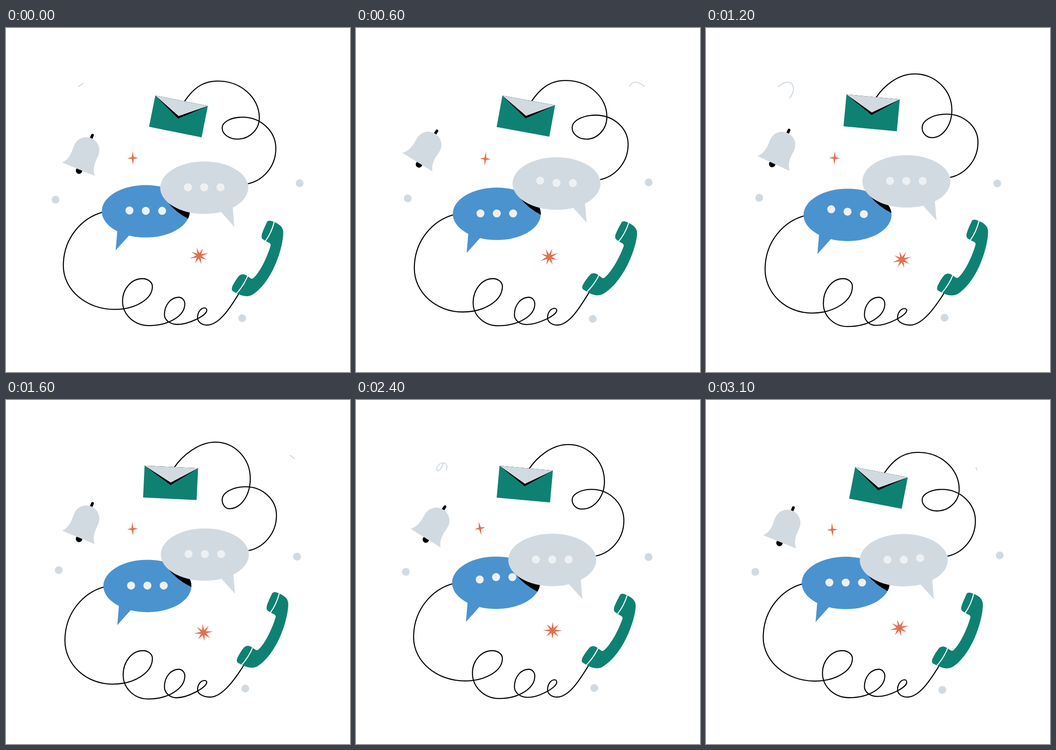
Recreate the animation shown at these times as an HTML page. Size 748 px wide and 748 px high, loop 3200 ms.

```html
<!DOCTYPE html>
<html lang="en">
<head>
<meta charset="utf-8">
<title>Messages</title>
<style>
  html, body { margin: 0; width: 100%; height: 100%; overflow: hidden; background: #fff; }
  svg { display: block; width: 100%; height: 100%; }
  .pale { fill: #d2dae1; }
  .teal { fill: #0f8173; }
  .coral { fill: #e07050; }
  .cord { fill: none; stroke: #000; stroke-width: 2.3; }
  .curl { fill: none; stroke: #d2dae1; stroke-width: 2.2; }
  .seam { fill: none; stroke: #fff; stroke-width: 2.2; }
  .dots { fill: #eef1f3; }
</style>
</head>
<body>
<svg viewBox="0 0 748 748">
  <defs>
    <clipPath id="blueClip"><ellipse rx="95.7" ry="57"/></clipPath>
    <path id="curl" pathLength="100" d="M157 128C164 122 171 117 180 118C191 120 192 132 188 142C184 152 179 155 176 153C173 147 182 136 190 136.5C197 137 200 145 196 153"/>
  </defs>

  <use id="curlLeft" class="curl" href="#curl"/>
  <use id="curlRight" class="curl" href="#curl" transform="translate(785 0) scale(-1 1)"/>

  <circle id="dotLeft" class="pale" r="8.5"/>
  <circle id="dotRight" class="pale" r="8.5"/>
  <circle id="dotBottom" class="pale" r="8.5"/>

  <path id="sparkle" class="coral"/>
  <path id="burst" class="coral"/>

  <path id="upperCord" class="cord"/>
  <path id="lowerCord" class="cord"/>

  <g id="envelope">
    <path class="teal" d="M0 0H116.5V69.5H0Z"/>
    <path d="M0 0H116.5L58.5 39.5Z"/>
    <path class="pale" d="M0 0H116.5L58.5 34Z"/>
  </g>

  <!-- The bell hangs from a pivot 61 units above its dome. -->
  <g id="bell"><g transform="translate(0 61)">
    <circle id="clapper" cy="47" r="7"/>
    <path d="M0-24V-35.5" stroke="#000" stroke-width="6" stroke-linecap="round"/>
    <path class="pale" d="M-38.5 44.6C-32 37-29 31-28 16L-28.5 0A28.5 28.5 0 0 1 28.5 0L28 16C29 31 32 37 38.5 44.6Z"/>
  </g></g>

  <g id="blue">
    <g fill="#4b93cf"><ellipse rx="95.7" ry="57"/><path d="M-34 50L-65.5 85-61.5 38Z"/></g>
    <g id="blueDots" class="dots"/>
    <g clip-path="url(#blueClip)"><path id="shade" d="M-78 33Q-61 54-34 68L-20 75V20Z"/></g>
  </g>
  <g id="grey">
    <g class="pale"><ellipse rx="95.7" ry="57"/><path d="M34 50L65.5 85 61.5 38Z"/></g>
    <g id="greyDots" class="dots"/>
  </g>

  <g id="phone"><g transform="translate(-531.5 -493.5)">
    <path class="teal" d="M571 419C573 418 576 418.500 584 422C595 427 603 433 602.500 446C602 470 590 512 570 543C558 562 545 574 535 580C525 585 515 583 502 577L493 572C490 570 490 566 492 561C496 553 501 545 506 539C510 535 516 534 521 537L526 540C531 544 534 546 537 544C552 531 568 497 575 473C576 469 573 467 568 465L558 459C555 457 555 452 556 448C559 438 564 429 567 422C568 420 569 419 571 419Z"/>
    <path class="seam" d="M583 421Q577 445 563 464M526 537Q516 561 500 578"/>
  </g></g>
</svg>
<script>
const LOOP = 3200, STEP = 100, SWING = LOOP / 2, BOUNCE = LOOP / 3;
const $ = id => document.getElementById(id);
const mod = (a, n) => ((a % n) + n) % n;
const clamp = v => Math.min(1, Math.max(0, v));

// A cosine around a centre that is highest at the given time.
const wave = (center, reach, peak, period = LOOP) =>
  t => center + reach * Math.cos((t - peak) / period * 2 * Math.PI);
const drift = (x, y) => {
  const fx = wave(...x), fy = wave(...y);
  return t => [fx(t), fy(t)];
};

const move = {
  envelope: drift([313, 11.7, 40], [144.7, 2.6, 350]),
  grey: drift([431.7, 5, 870], [341.7, 8.2, 2778]),
  blue: drift([305.7, 2.1, 1300], [401.5, 5, 1120]),
  bell: drift([197.7, 9, 2400], [205.3, 6.6, 2740]),
  phone: drift([537.3, 5.9, 1400], [493.3, 1.2, 2650]),
  sparkle: drift([275.5, 6, 780], [281.6, 2.9, 590]),
  burst: drift([424.5, 5.6, 1870], [500.5, 5.2, 1670]),
  dotLeft: drift([111.2, 4.6, 1240], [371.7, 2.5, 2750]),
  dotRight: drift([635.7, 2.9, 3110], [338.9, 3.1, 2145]),
  dotBottom: drift([517, 3.5, 1750], [629.2, 3.4, 535])
};
const turn = {
  envelope: wave(7, 4.7, 210),
  sparkle: wave(-2.7, 8, 740),
  burst: wave(-11, 13.5, 2200),
  bell: wave(27, 5.2, 690, SWING),
  phone: wave(1.3, 2.2, 560, SWING)
};
const clapperX = wave(2.2, 4.5, 400, SWING);

// Extreme points of the upper cord.
const cordTop = drift([458, 4.5, 2750], [103.5, 13.6, 260]);
const cordRight = drift([541, 9.9, 40], [183, 13.5, 220]);
const loopLow = drift([494.5, 9.2, 200], [239, 3.2, 300]);
const loopTop = drift([517.5, 6.2, 1110], [191.3, 4, 2765]);
const lift = wave(0, 1.6, 1800);

function star(count, radius, inner) {
  const polar = (r, i) => {
    const a = i / count * 2 * Math.PI;
    return [r * Math.sin(a), -r * Math.cos(a)];
  };
  let points = [];
  for (let i = 0; i < count; i++) points.push(polar(radius(i), i), polar(inner, i + 0.5));
  return "M" + points.join("L") + "Z";
}
$("sparkle").setAttribute("d", star(4, i => i % 2 ? 12 : 15, 3));
$("burst").setAttribute("d", star(8, i => i % 4 === 2 ? 21 : 18.7, 6));

for (const id of ["blueDots", "greyDots"])
  $(id).innerHTML = [-35.5, 0, 35.5].map(x => `<circle cx="${x}" r="8.7"/>`).join("");

// Quarter-ellipse arcs joining points that alternate between vertical and horizontal tangents.
function arcs(points, vertical) {
  const k = 0.5523;
  let d = "";
  for (let i = 1; i < points.length; i++, vertical = !vertical) {
    const [a, b] = points[i - 1], [c, e] = points[i], dx = (c - a) * k, dy = (e - b) * k;
    d += vertical ? `C${a} ${b + dy} ${c - dx} ${e} ${c} ${e}` : `C${a + dx} ${b} ${c} ${e - dy} ${c} ${e}`;
  }
  return d;
}

// Where a local point of a moving part lies on the stage.
function anchor(id, t, dx, dy) {
  const [x, y] = move[id](t), a = turn[id](t) * Math.PI / 180, c = Math.cos(a), s = Math.sin(a);
  return [x + dx * c - dy * s, y + dx * s + dy * c];
}

function drawUpperCord(t, [gx, gy]) {
  const [sx, sy] = anchor("envelope", t, 64, 2);
  const top = cordTop(t), far = [gx + 155.7, gy - 85.3];
  const [ex, ey] = [gx + 95, gy - 8.7];
  $("upperCord").setAttribute("d", `M${sx} ${sy}C${sx + 18} ${sy - 27} ${top[0] - 36} ${top[1]} ${top}`
    + arcs([top, cordRight(t), loopLow(t), [470, 217], loopTop(t), far], false)
    + `C${far[0]} ${far[1] + 42} ${ex + 30} ${ey - 6} ${ex} ${ey}`);
}

function drawLowerCord(t, [bx, by]) {
  const sag = by - 398, rise = lift(t);
  const [ex, ey] = anchor("phone", t, -23.5, 80.5);
  const endX = 437 + (ex - 508) * 0.6;
  const left = [bx - 179.3, by + 118.5], bottom = [373 - sag * 0.4, 646 + rise];
  $("lowerCord").setAttribute("d",
    `M${bx - 94} ${by + 2}C${bx - 138} ${by + 14} ${left[0]} ${by + 57} ${left}`
    + arcs([left, [236.5 - sag * 0.75, by + 213.4], [318.3, 562], [296.5 + sag * 0.2, 545],
      [253.3 + sag * 0.22, 594 + sag * 0.6], [311 - sag * 0.35, 648.6 + rise],
      [388.8, 600], [375.5, 585.5], [344.5, 623.5], bottom], true)
    + `C${bottom[0] + 25} ${bottom[1]} 436.5 625 436.5 614`
    + arcs([[436.5, 614], [432, 608.5 + sag * 0.2], [416.5, 630], [endX, 646]], true)
    + `C${endX + 28} 646 ${ex - 18} ${ey + 29} ${ex} ${ey}`);
}

function bounceDots(id, t, start) {
  [...$(id).children].forEach((dot, i) => {
    const u = clamp((mod(t - start, BOUNCE) - i * BOUNCE / 16) / 400);
    dot.setAttribute("cy", -1 - 6.1 * (1 - Math.cos(u * 2 * Math.PI)));
  });
}

function trimCurl(id, t, start) {
  const u = mod(t - start, BOUNCE);
  const head = 100 * clamp(u / 290), tail = 100 * clamp((u - 166) / 320);
  const { style } = $(id);
  style.visibility = head > tail ? "visible" : "hidden";
  style.strokeDasharray = `${head - tail} 1000`;
  style.strokeDashoffset = -tail;
}

function render(t) {
  for (const id in move) {
    const spin = turn[id] ? `rotate(${turn[id](t)})` : "";
    $(id).setAttribute("transform", `translate(${move[id](t)}) ${spin}`);
  }
  const grey = move.grey(t), blue = move.blue(t);
  $("shade").setAttribute("transform", `translate(${grey[0] - blue[0]} ${grey[1] - blue[1]})`);
  $("clapper").setAttribute("cx", clapperX(t));
  drawUpperCord(t, grey);
  drawLowerCord(t, blue);
  bounceDots("blueDots", t, -33);
  bounceDots("greyDots", t, 508);
  trimCurl("curlLeft", t, -33);
  trimCurl("curlRight", t, -33 + BOUNCE / 2);
}

const begin = performance.now();
function tick() {
  const elapsed = (performance.now() - begin) % LOOP;
  render(Math.floor(elapsed / STEP) * STEP);
  requestAnimationFrame(tick);
}
tick();
</script>
</body>
</html>
```
